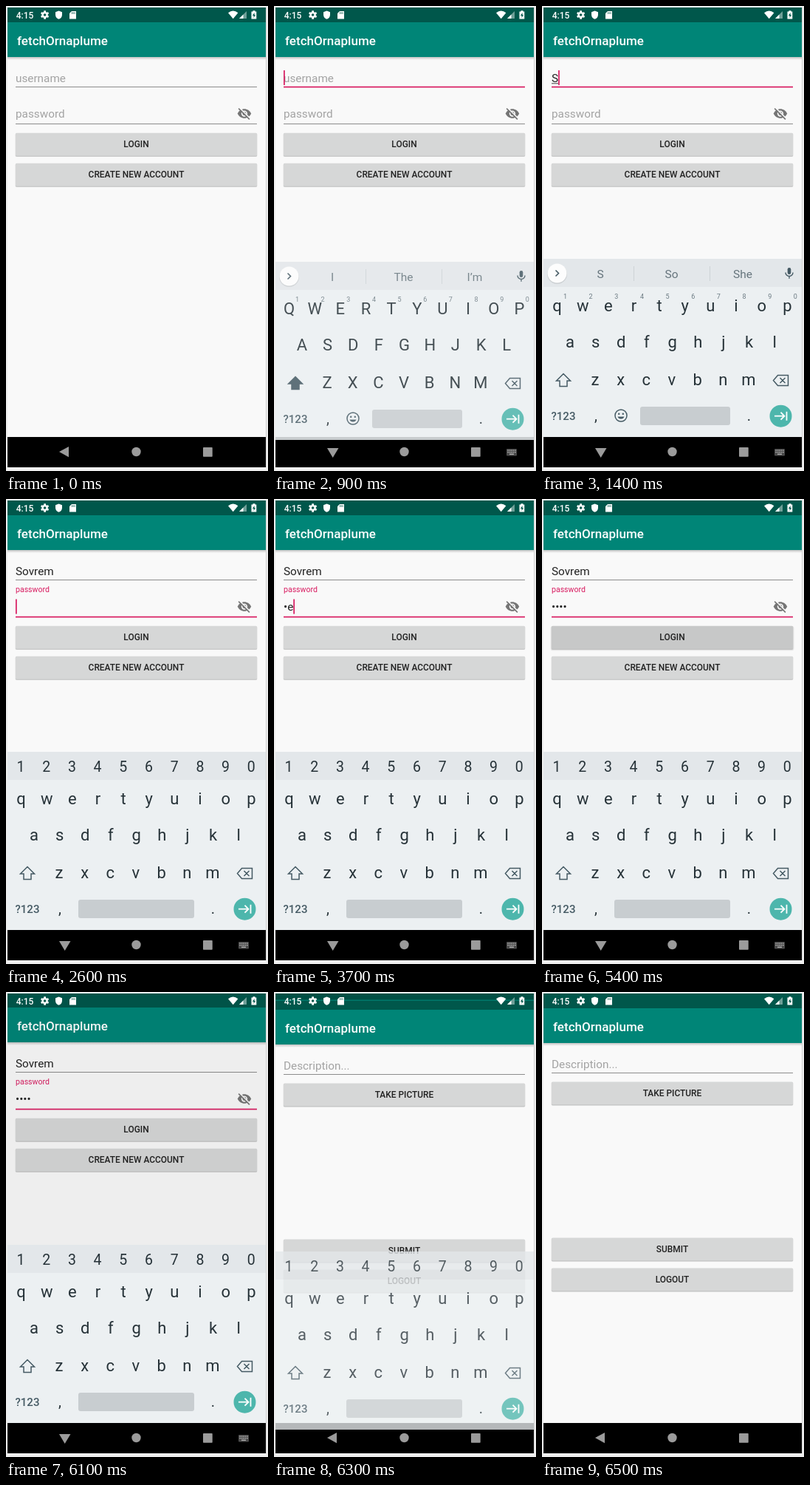
Recreate the animation shown at these times as an HTML page. Size 355 by 629 pixels, loop 8 s.

```html
<!DOCTYPE html>
<html lang="en">
<head>
<meta charset="utf-8">
<title>Login demo</title>
<style>
html, body { margin: 0; width: 100%; height: 100%; overflow: hidden; background: #efefef; }
svg { display: block; width: 100vw; height: 100vh; font-family: Roboto, sans-serif; }
</style>
</head>
<body>
<svg id="stage" viewBox="0 0 355 629"></svg>
<script>
const LOOP = 8000, STEP = 100;
const PINK = '#d81b60', HINT = '#a3a3a3', INK = '#263238', KEY = '#455a64';
const APP = 'fetchOrnaplume', USER = 'Sovrem', FIELD = 15.3;
const stage = document.getElementById('stage');
const pen = document.createElement('canvas').getContext('2d');

const text = (s, x, y, size, fill, anchor = 'start', weight = 400) =>
  `<text x="${x}" y="${y}" font-size="${size}" fill="${fill}" text-anchor="${anchor}" font-weight="${weight}">${s}</text>`;
const rect = (x, y, w, h, fill, more = '') =>
  `<rect x="${x}" y="${y}" width="${w}" height="${h}" fill="${fill}" ${more}/>`;
const path = (d, fill, more = '') => `<path d="${d}" fill="${fill}" ${more}/>`;
const line = (d, color, width) => path(d, 'none', `stroke="${color}" stroke-width="${width}"`);
const circle = (x, y, r, fill, more = '') => `<circle cx="${x}" cy="${y}" r="${r}" fill="${fill}" ${more}/>`;
const group = (s, more) => `<g ${more}>${s}</g>`;
const shift = (s, y, opacity = 1) => group(s, `transform="translate(0 ${y})" opacity="${opacity}"`);

// Latest value whose start step has been reached
const at = (step, keys) => keys.reduce((v, [k, next]) => step >= k ? next : v, keys[0][1]);

function widthOf(s) {
  pen.font = `${FIELD}px Roboto, sans-serif`;
  return pen.measureText(s).width;
}

const DEFS = `<defs>
  <linearGradient id="fade" x2="0" y2="1"><stop stop-opacity=".22"/><stop offset="1" stop-opacity="0"/></linearGradient>
  <clipPath id="screen">${rect(2, 2, 350, 622, '#000')}</clipPath>
</defs>`;

function button(label, y, press = 0) {
  return rect(12.5, y + .6, 328, 31.6, '#000', 'rx="2" opacity=".1"') +
    (press ? rect(11.5, y, 330, 33.5, '#000', `rx="3" opacity="${press}"`) : '') +
    rect(13, y + .5, 327, 31.3, '#b9baba', 'rx="1.5"') +
    rect(13, y, 327, 31, '#d6d7d7', 'rx="1.5"') +
    (press ? rect(13, y, 327, 31, '#000', `rx="1.5" opacity="${press}"`) : '') +
    text(label, 176.5, y + 19.7, 11.93, '#212121', 'middle', 500);
}

const underline = (y, focused) => focused
  ? rect(13, y - .8, 327, 1.7, PINK)
  : rect(13, y - .5, 327, 1, '#8c8c8c');

function activity(content) {
  return rect(2, 2, 350, 622, '#f9f9f9') + rect(2, 69, 350, 4, 'url(#fade)') +
    rect(2, 2, 350, 20, '#00574b') + rect(2, 22, 350, 47, '#008577') +
    text(APP, 15, 52.5, 17.04, '#fff', 'start', 500) + content;
}

const EYE = group(
  path('M1 12C5 2 19 2 23 12C19 22 5 22 1 12z', '#757575') + circle(12, 12, 5, '#f9f9f9') +
  circle(12, 12, 3, '#757575') + line('M4 2.5L22 20.5', '#f9f9f9', 2) + line('M2.6 3.6L20.4 21.4', '#757575', 1.9),
  'transform="translate(313 135.6) scale(.83)"');

function login(step) {
  const typed = USER.slice(0, at(step, [[0, 0], [13, 1], [16, 2], [18, 3], [20, 4], [21, 5], [22, 6]]));
  const secret = at(step, [[0, ''], [36, 't'], [37, '•e'], [38, '••s'], [39, '•••t'], [54, '••••']]);
  const onUser = step >= 5 && step < 24, onPass = step >= 24;
  const userCaret = at(step, [[0, 0], [6, 1], [10, 0], [13, 1], [24, 0]]);
  const passCaret = at(step, [[0, 0], [24, 1], [29, 0], [33, 1], [44, 0], [49, 1], [54, 0]]);
  const lift = at(step, [[0, 0], [24, .35], [25, .85], [26, 1]]);
  const press = at(step, [[0, 0], [52, .06], [53, .12], [54, .07], [55, 0]]);
  const caret = (s, y) => rect(13 + widthOf(s), y, 1.7, 20, PINK);

  return activity(
    (typed ? text(typed, 13, 102.7, FIELD, '#212121') : text('username', 13, 102.7, FIELD, HINT)) +
    (typed && onUser ? rect(13, 104.3, widthOf(typed), 1, '#424242') : '') +
    underline(109.5, onUser) + (userCaret ? caret(typed, 87) : '') +
    text('password', 13, 150.7 - 24.5 * lift, FIELD - 4.75 * lift, onPass ? PINK : HINT) +
    text(secret, 13, 150.7, FIELD, '#212121') +
    underline(159.5, onPass) + (passCaret ? caret(secret, 135.5) : '') +
    EYE + button('LOGIN', 171.7, press) + button('CREATE NEW ACCOUNT', 212.7));
}

const compose = () => activity(
  text('Description...', 13, 102.7, FIELD, HINT) + underline(109.5) +
  button('TAKE PICTURE', 121.5) + button('SUBMIT', 332.5) + button('LOGOUT', 373.5));

function suggestions(words) {
  return circle(20.5, 362.5, 13.5, '#000', 'opacity=".1"') + circle(20.5, 361.5, 13, '#fdfdfd') +
    line('M18.5 357.5l4 4l-4 4', KEY, 1.6) +
    words.map((w, i) => text(w, 79 + 96.5 * i, 367.5, 15.5, '#66757d', 'middle')).join('') +
    rect(124, 352, 1, 20, '#cdd3d6') + rect(227, 352, 1, 20, '#cdd3d6') +
    rect(332.7, 354, 4.6, 9, KEY, 'rx="2.3"') + line('M330 360.5a5 5 0 0 0 10 0M335 365.5v3.2', KEY, 1.4);
}

function keyboard(step) {
  const digits = step >= 25, caps = step < 14;
  const words = at(step, [[0, 'I The I’m'], [14, 'S So She'], [16, 'So Some Soon'], [18, 'Sov Sob Sow'],
    [20, 'Sovr Sour Sober'], [21, 'Sovre Score Sore'], [22, 'Sovrem Storm Serum']]).split(' ');
  const rows = [['qwertyuiop', 20.5, 412.8], ['asdfghjkl', 38, 462.3], ['zxcvbnm', 72, 512.8]];
  const letters = rows.map(([row, x, y]) => [...(caps ? row.toUpperCase() : row)]
    .map((c, i) => text(c, x + 34.65 * i, y, 22, INK, 'middle')).join('')).join('');
  const numbers = [...'1234567890'].map((c, i) => digits
    ? text(c, 20 + 34.7 * i, 369.3, 19.5, INK, 'middle')
    : text(c, 31.5 + 34.65 * i, 395.6, 9, '#6b7a82', 'middle')).join('');
  const smile = circle(107, 554, 8, 'none', `stroke="${KEY}" stroke-width="1.5"`) +
    circle(104.2, 551.8, 1.2, KEY) + circle(109.8, 551.8, 1.2, KEY) + path('M102.5 555.5h9a4.7 4.3 0 0 1-9 0z', KEY);
  const bar = digits ? 98 : 133;

  return rect(2, 342, 350, 241, '#ecf0f2') + rect(2, 342, 350, 38, '#e3e7ea') + rect(2, 583, 350, 41, '#000') +
    (digits ? '' : suggestions(words)) + numbers + letters +
    path('M29 497.5L38.5 507H34V514.5H24V507H19.5Z', caps ? KEY : 'none', `stroke="${KEY}" stroke-width="1.5"`) +
    line('M319.5 499.5H333.5V513.5H319.5L313.5 506.5ZM322.5 503l7 7m0-7l-7 7', KEY, 1.5) +
    text('?123', 29, 559.7, 15, KEY, 'middle', 500) + text(',', 73, 561, 20, INK, 'middle') +
    (digits ? '' : smile) + rect(bar, 542, 255 - bar, 25, '#c8cdd0', 'rx="3"') +
    text('.', 280.5, 561, 20, INK, 'middle') + circle(323.5, 554.7, 15, '#4db6ac') +
    line('M315 554.7h13M323.5 549.7l5 5l-5 5M331.5 548.7v12', '#fff', 1.8);
}

function statusIcons() {
  const teeth = [0, 60, 120].map(a => rect(51.2, 6.3, 2.8, 11.4, '#fff', `transform="rotate(${a} 52.6 12)"`)).join('');
  return text('4:15', 13.7, 16.8, 12, '#fff', 'start', 500) +
    teeth + circle(52.6, 12, 4.2, '#fff') + circle(52.6, 12, 1.8, '#00574b') +
    path('M71.5 6.5L76 8.3V12C76 14.8 74 17 71.5 17.8C69 17 67 14.8 67 12V8.3Z', '#fff') +
    path('M89 7H95V17.5H86V10Z', '#fff') +
    line('M89.5 8.3v2.4M91.3 8.3v2.4M93.1 8.3v2.4', '#00574b', .8) +
    path('M301 9.2Q307.7 3.6 314.4 9.2L307.7 17.2Z', '#fff') +
    path('M326 7V17H316Z', '#6f9f98') + path('M321.5 11.5V17H316Z', '#fff') +
    path('M332.5 7.5H334.5V6.3H337.5V7.5H339.3V17.5H332.5Z', '#fff') +
    path('M336.6 9L334 13H335.6V16L338 12H336.6Z', '#00574b');
}

function navIcons(open) {
  const gray = '#9b9b9b';
  const keys = rect(315, 599, 14, 9.5, '#4a4a4a', 'rx="1"') +
    line('M316.5 601.2h11M316.5 603.6h11', '#c4c4c4', '1.2" stroke-dasharray="1.4 1') + rect(319, 605.6, 6, 1.2, '#c4c4c4');
  return path(open ? 'M72 598H87.5L79.7 611Z' : 'M72 603L85 596V610.2Z', gray) +
    circle(176.5, 603, 6.2, gray) + rect(267, 597, 12.7, 12.7, gray, 'rx=".8"') + (open ? keys : '');
}

// Vertical offset and opacity of the keyboard window
const keyboardPose = step => at(step, [[0, null], [8, [14, .4]], [9, [4, .85]], [10, [0, 1]],
  [62, [2, .95]], [63, [9, .77]], [64, [16, .3]], [65, null]]);

function draw(step) {
  const dim = at(step, [[0, 0], [61, .045], [62, .09]]);
  const enter = at(step, [[0, null], [62, [6, 90]], [63, [2, 12]], [64, [1, 4]], [65, [0, 2]]]);
  const pose = keyboardPose(step);
  let s = '';
  if (step < 65) {
    s += shift(login(step), step >= 61 ? -1 : 0);
    if (dim) s += rect(2, 2, 350, 622, '#000', `opacity="${dim}"`);
  }
  if (enter) {
    const [dy, top] = enter;
    s += `<clipPath id="reveal">${rect(2, top, 350, 624 - top, '#000')}</clipPath>` +
      group(shift(compose(), dy), 'clip-path="url(#reveal)"');
    if (step === 63) s += rect(2, 10.5, 350, 1.5, '#00796b');
  }
  s += rect(2, 583, 350, 41, '#000');
  if (pose) s += shift(keyboard(step), ...pose);
  s += statusIcons() + navIcons(step >= 8 && step < 63);
  stage.innerHTML = DEFS + rect(0, 0, 355, 629, '#efefef') + rect(352, 2, 1, 622, '#d2d2d2') +
    group(s, 'clip-path="url(#screen)"');
}

let shown = -1;
const start = performance.now();
function tick() {
  const step = Math.floor((performance.now() - start) % LOOP / STEP);
  if (step !== shown) draw(shown = step);
  requestAnimationFrame(tick);
}
tick();
</script>
</body>
</html>
```
